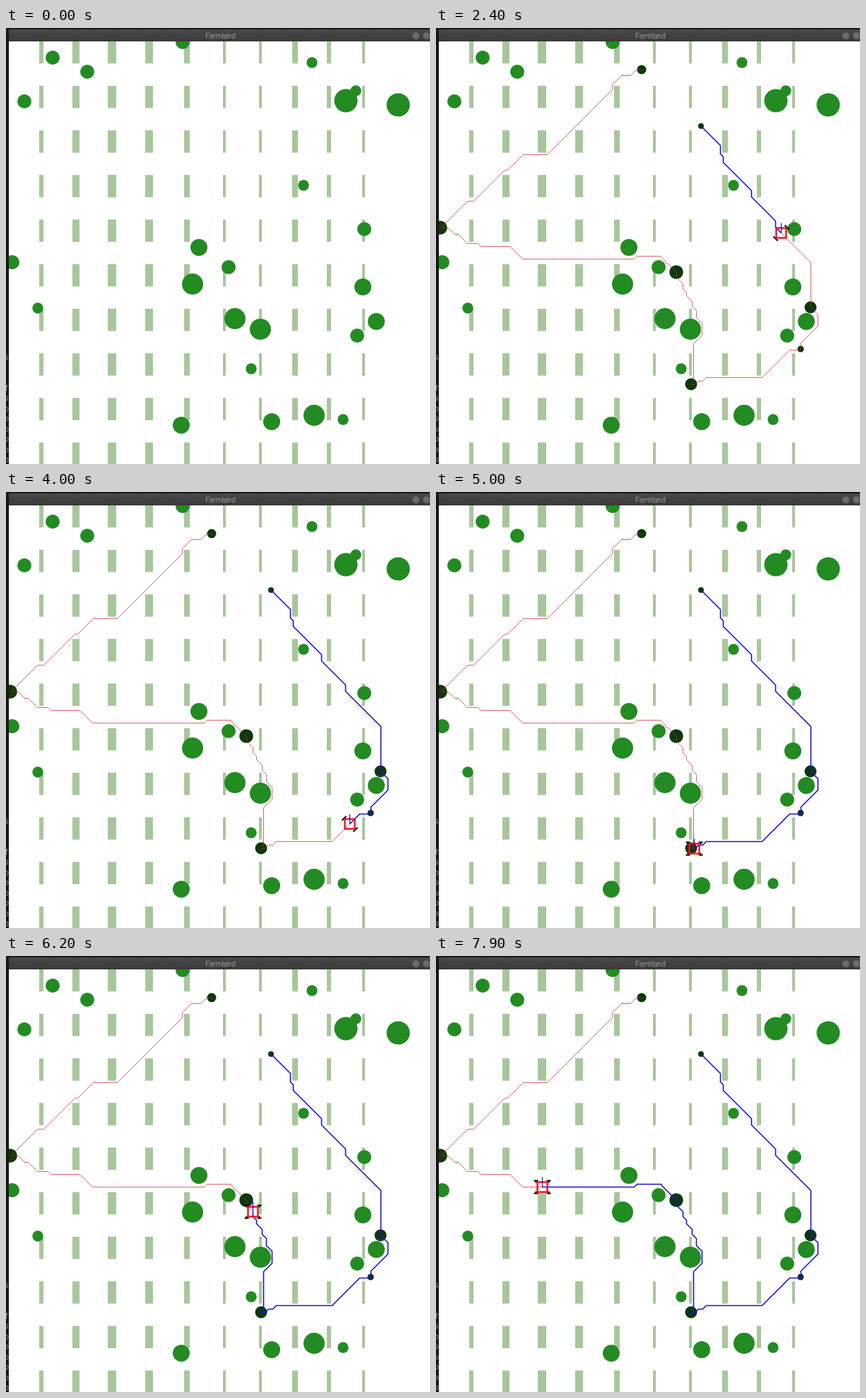
Animation of 600x618 px, one loop 8000 ms. Source, as an HTML page with a canvas:

```html
<!DOCTYPE html>
<html lang="en">
<head>
<meta charset="utf-8">
<title>Farmland</title>
<style>
  html, body { margin: 0; width: 100%; height: 100%; overflow: hidden; background: #fff; }
  canvas { display: block; }
</style>
</head>
<body>
<canvas id="stage" width="600" height="618"></canvas>
<script>
const ctx = document.getElementById('stage').getContext('2d');

const LOOP = 8000, TICK = 100;
const WEEDS_AT = 500, ROUTE_AT = 1100, START_AT = 1163;
const SPEED = 0.1218; // grid steps per ms, a diagonal step counts as one

const parse = text => text.trim().split(/\s+/).map(p => p.split(',').map(Number));

// Evenly planted columns with a slight sway
const columns = [6, 10, 12, 11, 8, 4, 4, 8, 6, 4].map((width, i) => ({
  width, x: Math.round(51.6 + 50.8 * i + 3.4 * Math.sin((i - 3.4) * 0.75) - width / 2)
}));

// Bush centres by radius
const bushes = {
  7.7: '433,49 495,89 421,223 45,397 347,483 477,555',
  10: '66,42 115,62 26,104 250,20 507,285 9,332 315,339 497,436',
  12: '273,311 505,367 524,416 248,563 376,558',
  15: '264,363 324,412 360,427 436,549',
  16.5: '481,103 555,109'
};

// Turning points of the route; a third value is the radius of a weed there
const turns = parse(`375,139,4 402,178 406,190 446,239 480,282 530,396,8.5 540,422
  516,455,4.5 500,456 382,495 371,500 361,505,8.5 364,447 376,418 368,400 362,387
  354,374 349,362 340,346,9.8 319,324 284,323 275,327 122,327 63,309 44,305 26,292
  6,283,9.8 53,245 101,201 157,179 249,80 275,67 291,59,6.5`);
const weeds = turns.filter(p => p.length === 3);

// Grid planner: between turning points go diagonally first, then straight
const route = turns.flatMap(([x, y], i) => {
  if (i === 0) return [[x, y]];
  const [px, py] = turns[i - 1];
  const diagonal = Math.min(Math.abs(x - px), Math.abs(y - py));
  return [[px + diagonal * Math.sign(x - px), py + diagonal * Math.sign(y - py)], [x, y]];
});

function rect(color, x, y, w, h) {
  ctx.fillStyle = color;
  ctx.fillRect(x, y, w, h);
}

function disc(color, x, y, r) {
  ctx.fillStyle = color;
  ctx.beginPath();
  ctx.arc(x, y, r, 0, Math.PI * 2);
  ctx.fill();
}

function line(color, width, points) {
  ctx.strokeStyle = color;
  ctx.lineWidth = width;
  ctx.beginPath();
  for (const [x, y] of points) ctx.lineTo(x + 0.5, y + 0.5);
  ctx.stroke();
}

// Part of the route already driven, and the current heading
function drive(steps) {
  const trail = [route[0]];
  let heading = [1, 1];
  for (let i = 1; i < route.length && steps > 0; i++) {
    const [ax, ay] = route[i - 1], [bx, by] = route[i];
    const length = Math.max(Math.abs(bx - ax), Math.abs(by - ay));
    if (length === 0) continue;
    const done = Math.round(Math.min(steps, length));
    heading = [Math.sign(bx - ax), Math.sign(by - ay)];
    trail.push([ax + heading[0] * done, ay + heading[1] * done]);
    steps -= length;
  }
  return { trail, heading };
}

function drawRobot([x, y], [hx, hy]) {
  const slope = hx * hy;
  for (const sx of [-1, 1]) {
    if (slope) {
      const wx = x + 8 * sx, wy = y - 8 * sx * slope;
      line('#000', 2, [[wx - 3, wy - 3 * slope], [wx + 3, wy + 3 * slope]]);
    } else {
      for (const sy of [-1, 1]) {
        line('#000', 2, [[x + 6 * sx, y + 9 * sy], [x + 12 * sx, y + 9 * sy]]);
        line('#000', 2, [[x + 9 * sx, y + 9 * sy], [x + 9 * sx, y + 6 * sy]]);
      }
    }
  }
  ctx.strokeStyle = '#f01020';
  ctx.lineWidth = 2.4;
  ctx.strokeRect(x - 6.5, y - 6.5, 14, 14);
  line('#1c10c8', 1.2, [[x, y], [x, y - 14]]);
}

function drawWindow() {
  rect('#161616', 0, 0, 600, 618);
  const bar = ctx.createLinearGradient(0, 1, 0, 19);
  bar.addColorStop(0, '#4b4b4b');
  bar.addColorStop(1, '#393939');
  rect(bar, 4, 2, 596, 17);
  ctx.font = '300 10.3px Roboto, sans-serif';
  ctx.textAlign = 'center';
  ctx.fillStyle = '#c4c4c4';
  ctx.fillText('Farmland', 303.5, 14.5);
  for (const x of [580, 595]) disc('#6b6b6b', x, 11, 5);
  // edge of a terminal behind the window
  ctx.font = '11px "DejaVu Sans Mono", monospace';
  ctx.textAlign = 'right';
  ctx.fillStyle = '#8c8c8c';
  [...'s  fsoooooo'].forEach((c, i) => ctx.fillText(c, 4, 470 + 14.5 * i));
  rect('#fff', 4, 19, 596, 599);
}

function drawField() {
  for (const { x, width } of columns)
    for (let row = 0; row < 10; row++) rect('#a8c69c', x, 18.7 + 63.2 * row, width, 31.6);
  for (const [radius, centres] of Object.entries(bushes))
    for (const [x, y] of parse(centres)) disc('#228b22', x, y, +radius);
}

function draw(t) {
  drawWindow();
  ctx.save();
  ctx.beginPath();
  ctx.rect(4, 19, 596, 599);
  ctx.clip();
  drawField();
  if (t >= WEEDS_AT) for (const w of weeds) disc('#0b380c', ...w);
  if (t >= ROUTE_AT) {
    const { trail, heading } = drive((t - START_AT) * SPEED);
    line('rgba(200, 30, 30, .68)', 1, route);
    line('#1c10c8', 1.6, trail);
    drawRobot(trail[trail.length - 1], heading);
  }
  ctx.restore();
}

const begin = performance.now();
function frame() {
  const t = (performance.now() - begin) % LOOP;
  draw(Math.floor(t / TICK) * TICK);
  requestAnimationFrame(frame);
}
frame();
</script>
</body>
</html>
```
